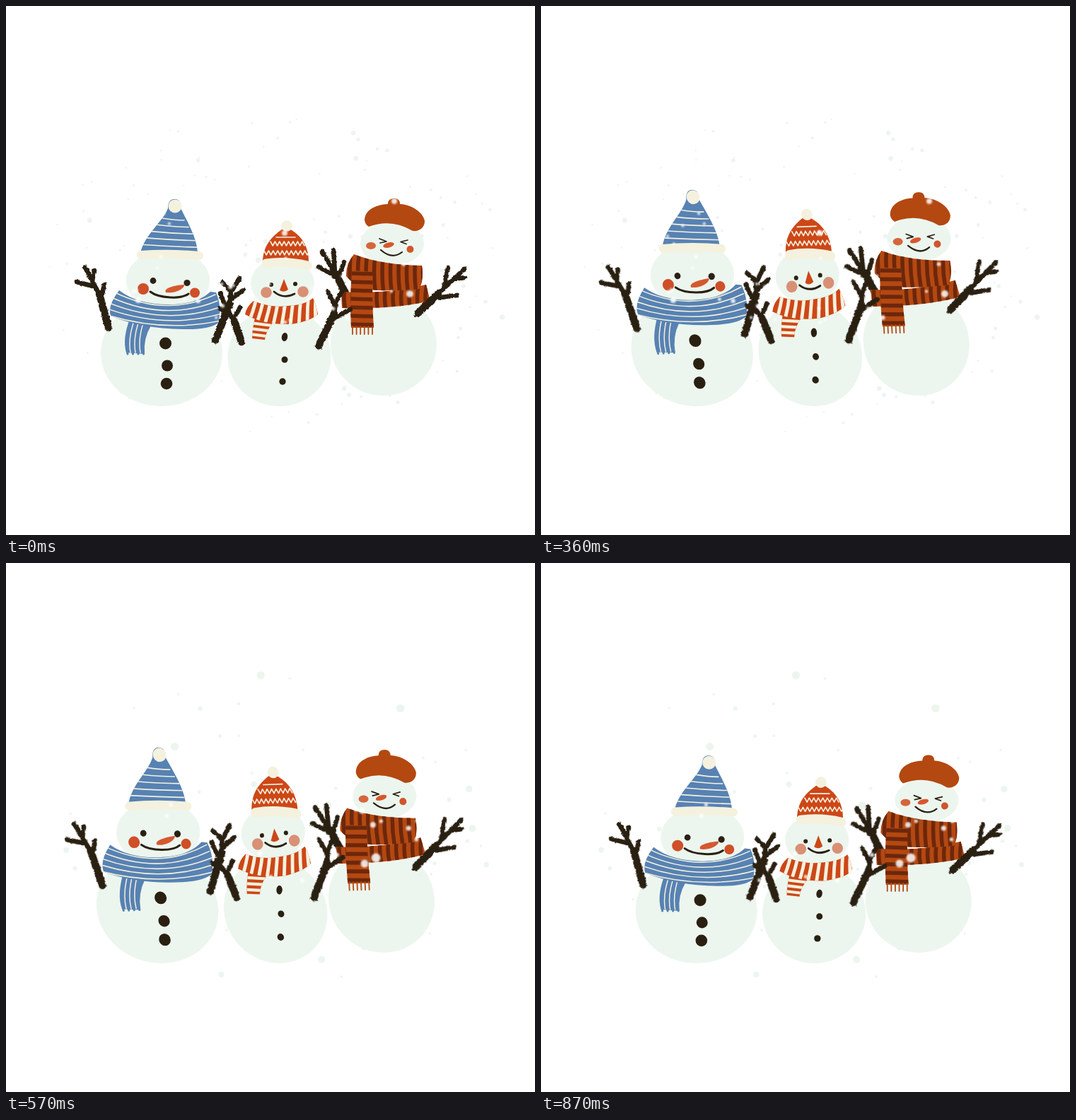
Write an HTML page that moves like this. It is 748 px wide and 748 px high and loops after 900 ms.

```html
<!DOCTYPE html>
<html lang="en">
<head>
<meta charset="utf-8">
<title>Swaying snowmen</title>
<style>
html, body { margin: 0; width: 100%; height: 100%; overflow: hidden; background: #fff; }
svg { display: block; width: 100vw; height: 100vh; }
.line { fill: none; stroke-linecap: round; stroke-linejoin: round; }
</style>
</head>
<body>
<svg id="stage" viewBox="0 0 748 748"></svg>
<script>
const SNOW = '#ecf6ee', CREAM = '#f4f1de', BLUE = '#5782b3', RED = '#cd4717',
      RUST = '#b44811', BROWN = '#6c270b', DARK = '#2a2012';

const range = (n, f) => Array.from({ length: n }, (_, i) => f(i)).join('');
const shape = (d, fill) => `<path d="${d}" fill="${fill}"/>`;
const line = (d, color, width) => `<path class="line" d="${d}" stroke="${color}" stroke-width="${width}"/>`;
const oval = (x, y, rx, ry, fill, turn = 0) =>
  `<ellipse cx="${x}" cy="${y}" rx="${rx}" ry="${ry}" fill="${fill}" transform="rotate(${turn} ${x} ${y})"/>`;
const disc = (x, y, r, fill) => oval(x, y, r, r, fill);
const arm = (trunk, twigs) =>
  `<g filter="url(#rough)">${line(trunk, DARK, 10.5)}${line(twigs, DARK, 6.5)}</g>`;

let clips = 0;
const striped = (d, fill, stripes) => {
  const id = 'clip' + clips++;
  return `<clipPath id="${id}"><path d="${d}"/></clipPath>${shape(d, fill)}<g clip-path="url(#${id})">${stripes}</g>`;
};

// Every part leans and stretches from the ground; tilt lifts its right side.
const parts = [];
const part = (man, tilt, content, lean = man.lean) => {
  parts.push({ ...man, tilt, lean });
  return `<g class="part">${content}</g>`;
};

const blueMan = { ground: 566, center: 225, lean: .101, stretch: .052 };
const redMan = { ground: 566, center: 391, lean: .099, stretch: .075 };
const beretMan = { ground: 551, center: 540, lean: .064, stretch: .037 };

function drawBlueMan() {
  const body = oval(220, 491, 86, 75, SNOW)
    + disc(225.5, 477, 8.5, DARK) + disc(228, 508.5, 8, DARK) + disc(227, 534, 8.3, DARK);
  const head = oval(229, 388, 59, 43, SNOW)
    + disc(194, 400, 8, '#cf4f28') + disc(267, 405.5, 7, '#cf4f28')
    + disc(208, 388.5, 4.4, DARK) + disc(256, 391.5, 4.6, DARK)
    + shape('M226 405C222 399 238 395 252 394C253 399 240 407 226 405Z', '#d6582f')
    + line('M204 404Q213 411 232 412Q250 413 258 407', DARK, 3);
  const hat = striped('M238 273C232 273 229 278 229 286C221 306 197 322 190 349H271C270 328 257 306 247 286C248 276 244 273 238 273Z', BLUE,
      line(range(5, i => `M${221 - 8 * i} ${300 + 9.3 * i}Q${238 - i} ${303 + 9.3 * i} ${252 + 6 * i} ${303 + 9.6 * i}`), CREAM, 1.6))
    + disc(239, 283, 9.5, CREAM)
    + line('M191 352Q230 349 273 353', CREAM, 12);
  const scarf = striped('M176 440L205 452Q194 470 196 492L170 490Q164 470 176 440Z', BLUE,
      line(range(3, i => `M${183 + 7 * i} 440q-11 28 -7 50`), CREAM, 1.5))
    + line(range(4, i => `M${171 + 7.5 * i} 485l1 7`), BLUE, 3)
    + striped('M160 402Q186 422 230 422Q270 422 289 404L297 405Q306 426 300 448Q288 458 250 457Q190 456 148 438Q143 424 160 402Z', BLUE,
      line(range(5, i => `M${152 - 3 * i} ${404 + 8 * i}Q225 ${441 + 5.5 * i} ${296 + 3 * i} ${408 + 9 * i}`), CREAM, 1.5));
  const arms = arm('M145 455L132 407', 'M132 408L112 370M122 396L100 390M122 388L125 374M134 415L139 394')
    + arm('M296 473L316 422', 'M316 422L318 405L330 385M318 403L306 391M319 414L335 402M310 424L303 406');
  return part(blueMan, 0, body) + part(blueMan, .06, head) + part(blueMan, .02, hat)
    + part(blueMan, .06, scarf) + part(blueMan, .085, arms);
}

function drawRedMan() {
  const zigzag = (x, y, n) => `M${x} ${y}` + range(n, i => `l3.2 ${i % 2 ? -6 : 6}`);
  const body = oval(386.5, 496, 73, 70, SNOW)
    + oval(394, 468, 4.2, 6, DARK, 10) + disc(394, 500, 4.5, DARK) + disc(391, 531, 4.7, DARK);
  const head = oval(391, 392, 45, 36, SNOW)
    + disc(368, 405, 7.8, '#d99075') + disc(420, 404, 7.8, '#d99075')
    + disc(375, 394, 3, DARK) + disc(409, 393, 3, DARK)
    + shape('M393 386L387 402Q393 406 399 401Z', RED)
    + line('M379 404Q392 415 408 407', DARK, 2.8);
  const hat = striped('M363 360C364 338 376 326 390 316Q397 313 404 317C420 327 428 342 428 362Z', RED,
      line(zigzag(374, 333, 15) + zigzag(365, 346, 20) + 'M382 327h27', CREAM, 1.6))
    + disc(397, 311, 7.8, CREAM)
    + line('M368 364Q396 360 426 367', CREAM, 13);
  const scarf = striped('M352 441L378 447Q367 460 366 472L348 470Q348 457 352 441Z', RED,
      line(range(3, i => `M345 ${448 + 8 * i}l32 4`), CREAM, 4))
    + striped('M350 417Q374 427 398 424Q422 423 434 413Q439 422 441 436Q430 446 402 450Q364 451 338 436Q340 425 350 417Z', RED,
      line(range(9, i => `M${354 + 10.5 * i} 413Q${350 + 10.8 * i} 432 ${341 + 12.2 * i} 452`), CREAM, 4.8));
  const arms = arm('M333 475L323 446', 'M322 444L308 424M318 438L303 428M322 442L331 426')
    + arm('M442 481L464 435', 'M464 436L466 420L476 402M465 424L455 404M463 442L487 429');
  return part(redMan, 0, body) + part(redMan, .1, head) + part(redMan, .04, hat)
    + part(redMan, .1, scarf) + part(redMan, .07, arms);
}

function drawBeretMan() {
  const body = oval(534, 478, 75, 73, SNOW);
  const head = oval(546, 336, 45, 31, SNOW)
    + oval(516, 339, 7, 5, '#d5663c') + disc(571.5, 344, 5, '#d0552b')
    + line('M528 329L538 333L529 335M568 331L558 333.5L566 336.5', DARK, 1.7)
    + oval(541, 338, 8, 3.5, '#d6582f', -15)
    + line('M530 345Q546 359 560 348', DARK, 2.2);
  const hat = shape('M507 303C507 290 520 281 540 280Q540 272 549 272Q557 272 557 280C574 281 590 292 592 304C592 314 584 319 575 318Q545 300 513 312Q508 309 507 303Z', RUST);
  const bars = (x, y, height) => line(range(12, i => `M${x + 11.5 * i} ${y}q-4 ${height / 2} 0 ${height}`), BROWN, 5.5);
  const scarf = striped('M474 404Q540 408 594 394L600 417Q550 429 475 427Z', RUST, bars(480, 394, 36))
    + striped('M492 351Q530 366 588 367Q591 384 585 400Q560 403 524 402Q496 400 481 382Q480 366 492 351Z', RUST, bars(488, 348, 58))
    + striped('M489 374L519 376Q517 410 520 455H488Q486 415 489 374Z', RUST,
      line(range(7, i => `M486 ${378 + 12 * i}l36 1`), BROWN, 5.5))
    + line(range(6, i => `M${490 + 5.6 * i} 453v11`), RUST, 1.8);
  const leftArm = arm('M482 410L466 378', 'M466 380L447 347M465 376L463 345M466 382L442 369M470 384L478 362');
  const rightArm = arm('M582 435L612 406', 'M612 406L648 372M619 400L625 370M633 386L649 384M607 413L638 409');
  return part(beretMan, 0, body, .055) + part(beretMan, .06, leftArm) + part(beretMan, .04, head)
    + part(beretMan, .02, hat) + part(beretMan, .03, scarf) + part(beretMan, .04, rightArm, .035);
}

// Seeded flakes spread evenly over an ellipse; most are small.
function flakes(count, seed, [x, y, rx, ry], small, large, fill) {
  const random = () => (seed = seed * 16807 % 2147483647) / 2147483647;
  return range(count, () => {
    const angle = 2 * Math.PI * random(), reach = Math.sqrt(random());
    return disc(x + rx * reach * Math.cos(angle), y + ry * reach * Math.sin(angle),
      small + (large - small) * random() ** 3, fill);
  });
}

const crowd = [380, 365, 225, 100];
const layer = (name, content) => `<g class="${name}">${content}</g>`;
const glow = content => `<g opacity=".85" filter="url(#soft)">${content}</g>`;

const stage = document.getElementById('stage');
stage.innerHTML = `<defs>
  <filter id="rough" x="-20%" y="-20%" width="140%" height="140%" color-interpolation-filters="sRGB">
    <feTurbulence type="fractalNoise" baseFrequency=".25" numOctaves="2" seed="3"/>
    <feDisplacementMap in="SourceGraphic" scale="3.5" xChannelSelector="R" yChannelSelector="G"/>
  </filter>
  <filter id="soft"><feGaussianBlur stdDeviation="1.2"/></filter>
</defs>`
  + layer('fine', flakes(150, 71, [390, 375, 335, 238], 1.2, 4, '#eef4f1'))
  + layer('big', flakes(70, 29, [378, 375, 312, 226], 1.8, 6, '#ecf6ee'))
  + drawBeretMan() + drawBlueMan() + drawRedMan()
  + layer('fine', glow(flakes(36, 5, crowd, 2, 3.5, '#fff') + disc(549, 276, 4, '#fff') + disc(571, 407, 5, '#fff')
    + disc(187, 416, 4, '#fff') + disc(394, 321, 4, '#fff')))
  + layer('big', glow(flakes(18, 11, crowd, 2.5, 4.5, '#fff') + disc(523, 417, 6.5, '#fff') + disc(507, 425, 5.5, '#fff')));

const groups = stage.querySelectorAll('.part');
const show = (name, visible) =>
  stage.querySelectorAll('.' + name).forEach(g => g.style.display = visible ? '' : 'none');

function pose(time) {
  const t = Math.floor(time % 900 / 30) * 30;
  const u = 1 - Math.abs(1 - t / 450);
  const s = .65 * u + .35 * (1 - Math.cos(Math.PI * u)) / 2;
  parts.forEach(({ ground, center, lean, stretch, tilt }, i) => {
    const m = [1, -tilt * s, lean * s, 1 + stretch * s, -lean * s * ground, s * (tilt * center - stretch * ground)];
    groups[i].setAttribute('transform', `matrix(${m})`);
  });
  show('fine', t < 540);
  show('big', t >= 450);
}

const start = performance.now();
function frame() {
  pose(performance.now() - start);
  requestAnimationFrame(frame);
}
frame();
</script>
</body>
</html>
```
